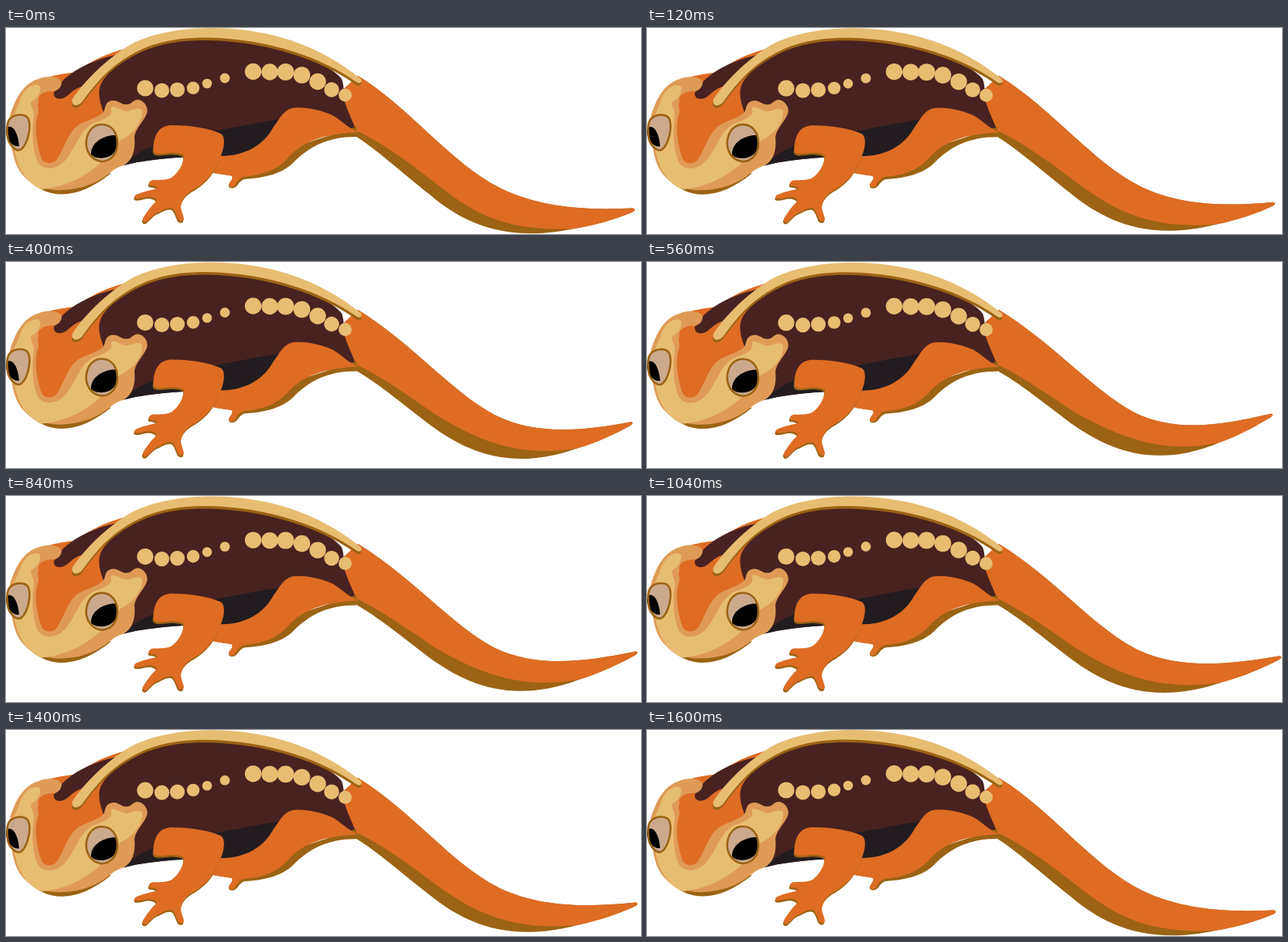
These frames come from a looping animation (821x267 px, 1.88 s). An HTML page with a canvas:

```html
<!DOCTYPE html>
<html lang="en">
<head>
<meta charset="utf-8">
<title>Newt</title>
<style>
  html, body { margin: 0; width: 100%; height: 100%; overflow: hidden; background: #fff; }
  canvas { display: block; width: 821px; height: 267px; }
</style>
</head>
<body>
<canvas id="stage"></canvas>
<script>
const W = 821, H = 267, LOOP = 1880, STEP = 40, MOVE_END = 1600;
const canvas = document.getElementById('stage');
const ctx = canvas.getContext('2d');
const ratio = window.devicePixelRatio || 1;
canvas.width = Math.round(W * ratio);
canvas.height = Math.round(H * ratio);

const color = {
  orange: '#de6c23', brown: '#9b6313', cream: '#e7bd72', tan: '#df9b56',
  maroon: '#482220', shade: '#221c20', lid: '#cba98d', black: '#000'
};

const shape = d => new Path2D(d);

const nape = shape('M14 100C36 60 66 61 92 57C110 42 130 33 157 26L200 40L135 112L95 165L55 182L25 150Z');
const napePatch = shape('M62 83C66 80 71 76 71 71C85 55 114 40 146 34L128 60L104 76C94 74 86 82 79 88C72 94 60 93 62 83Z');
const trunk = shape('M152 178C160 160 160 130 126 109C122 98 118 86 122 74C126 64 140 50 155 38C220 -2 340 10 400 42C415 50 428 58 434 66C438 76 436 88 438 96C442 108 448 121 453 133L345 142C330 158 300 166 280 166C240 167 195 167 152 178Z');
const belly = shape('M152 178C166 164 178 157 195 151C230 141 300 127 355 118L345 142C330 158 300 166 280 166C240 167 195 167 152 178Z');
const stripe = shape('M86 92C100 70 130 40 160 22C195 3 240 0 265 0C340 0 405 22 459 66C461 70 458 73 453 70C410 39 340 14 262 12.5C210 12 180 22 150 42C125 59 111 79 99 95C93 103 83 101 86 92Z');

const hindLegShade = shape('M453 128V141C415 141 392 154 372 174C358 188 338 194 308 196C302 198 300 204 297 206C293 209 287 208 288 203L296 192L268 188Z');
const hindLeg = shape('M456 135C444 131 434 120 422 113C408 107 390 102 372 103.500C358 106 354 118 346 128C334 150 312 166 276 166L266 187C276 190 284 190 292 192C294 196 289 199 288 203C288 207 294 207 296 204C299 199 302 194 308 192.500C332 191 350 184 364 169C384 146 412 137 456 135Z');
const foreLeg = shape('M191 154C192 135 200 126 215 126C240 126 262 130 278 137C284 141 282 155 279 162C272 184 262 197 245 208C233 214 227 222 226 232C227 239 230 244 230 248C229 251 224 251 222 247C219 239 217 233 213 233C205 233 200 238 196 239C190 242 185 249 182 251C178 253 175 249 178 245C183 237 188 230 194 225C196 222 192 220 188 219C180 218 175 222 168 221C164 219 167 216 171 215C177 212 188 210 196 208C195 205 190 204 186 204C183 202 185 198 190 197C200 197 208 197 214 194C222 188 230 177 230 165C222 159 205 163 197 163C190 162 190 159 191 154Z');

const chin = shape('M24 192C52 224 92 224 136 188Z');
const head = shape('M42 66C56 60 72 64 72 71C71 79 65 82 58 82C49 82 40 87 42 96C39 101 44 106 41 113C35 130 42 160 47 171C51 177 62 176 66 170C76 155 80 134 95 125C108 118 121 115 126 109C129 105 127 95 138 94C145 93 149 100 157 99C162 99 165 92 171 93C179 94 185 104 182 111C177 123 168 129 166 141C168 159 163 172 152 178C138 182 133 190 124 195C94 214 45 217 24 193C9 178 8 158 5 135C3 118 5 112 10 100C17 82 28 70 42 66Z');
const headLight = shape('M44 76C40 70 23 76 18 94C14 106 8 113 7 126C10 152 11 170 21 187C29 199 38 207 47 209C77 206 105 192 125 172C140 160 144 150 147 146C160 140 177 126 176 107C171 101 162 108 155 108C147 106 134 97 136 106C139 114 125 119 112 124C95 133 91 154 78 170C66 185 48 185 41 174C34 158 33 133 36 115C38 106 27 97 35 94C41 91 46 81 44 76Z');
const leftEye = shape('M4 119C10 111 25 110 29 118C33 129 28 150 20 157C13 162 2 150 2 139C1 131 1 124 4 119Z');
const leftPupil = shape('M3 128C10 126 16 138 17 153C11 155 1 147 0.500 138C0 134 0 130 3 128Z');
const rightEye = shape('M104 145C106 132 114 125 124 125C136 125 144 135 144 149C144 163 136 173 123 173C110 171 102 159 104 145Z');
const rightPupil = shape('M143 139C126 138 109 149 110 164C117 172 143 171 144 150Z');

// x, y, radius
const spots = [
  [180, 78, 10.6], [201.5, 81, 9.6], [221.5, 80, 9.6], [242, 77.7, 8.2], [260, 72, 6.3],
  [283, 65, 6.4], [319.5, 56.5, 10.7], [341, 57, 10.7], [361.5, 57, 11], [382.5, 61, 10.8],
  [403, 69.5, 10.7], [421, 80, 9.7], [438.5, 87, 8.5]
];

// Tail curves as x, y pairs for the lowered and the raised pose.
const tailTop = {
  low: [455, 62, 525, 105, 575, 176, 640, 208, 695, 235, 760, 236, 810, 233.5,
    814, 234, 814, 237, 809, 239, 790, 247, 765, 255, 735, 260],
  high: [455, 62, 525, 105, 575, 165, 630, 195, 685, 222, 745, 211, 805, 197,
    810, 196, 810, 199, 806, 201.5, 785, 214, 765, 225, 740, 234]
};
const tailBottom = {
  low: [640, 265, 600, 235, 560, 205, 520, 173, 485, 148, 453, 133],
  high: [660, 252, 600, 220, 555, 196, 520, 173, 485, 148, 453, 133]
};
const tailShade = {
  low: [645, 279, 590, 252, 548, 216, 510, 186, 480, 158, 453, 141],
  high: [655, 270, 595, 242, 548, 209, 510, 180, 480, 156, 453, 141]
};

// time, lift of the tail, outward stretch of its tip
const keys = [
  [0, 0, 0], [560, 1, 0], [840, 0.87, 7], [1040, 0.71, 10], [1120, 0.65, 11], [1600, 0, 0]
];

const mix = (a, b, k) => a + (b - a) * k;

function poseAt(time) {
  const next = Math.max(1, keys.findIndex(key => key[0] >= time));
  const a = keys[next - 1], b = keys[next];
  const k = (time - a[0]) / (b[0] - a[0]);
  return { lift: mix(a[1], b[1], k), stretch: mix(a[2], b[2], k) };
}

function bend(curve, pose) {
  const values = curve.low.map((v, i) => mix(v, curve.high[i], pose.lift));
  for (let i = 0; i < values.length; i += 2) {
    const reach = Math.max(0, (values[i] - 600) / 210);
    values[i] += pose.stretch * reach * reach;
  }
  return values;
}

function curves(path, values, start = 0) {
  for (let i = start; i < values.length; i += 6) path.bezierCurveTo(...values.slice(i, i + 6));
}

function fill(path, tone, dx = 0, dy = 0) {
  ctx.save();
  ctx.translate(dx, dy);
  ctx.fillStyle = tone;
  ctx.fill(path);
  ctx.restore();
}

function drawTail(pose) {
  const top = bend(tailTop, pose);
  for (const [under, tone] of [[tailShade, color.brown], [tailBottom, color.orange]]) {
    const path = new Path2D();
    path.moveTo(top[0], top[1]);
    curves(path, top, 2);
    curves(path, bend(under, pose));
    path.lineTo(425, 90);
    path.closePath();
    fill(path, tone);
  }
}

function drawEye(eye, pupil) {
  fill(eye, color.lid);
  fill(pupil, color.black);
  ctx.strokeStyle = color.brown;
  ctx.lineWidth = 2.6;
  ctx.stroke(eye);
}

function drawBody() {
  fill(nape, color.orange);
  fill(napePatch, color.maroon);
  fill(trunk, color.maroon);
  fill(belly, color.shade);
  fill(stripe, color.brown, -0.5, 3.5);
  fill(stripe, color.cream);
  fill(hindLegShade, color.brown);
  fill(hindLeg, color.orange);
  fill(foreLeg, color.brown, -0.8, 2.5);
  fill(foreLeg, color.orange);

  for (const [x, y, r] of spots) {
    const spot = new Path2D();
    spot.arc(x, y, r, 0, Math.PI * 2);
    fill(spot, color.cream);
  }

  fill(chin, color.brown);
  fill(head, color.tan);
  fill(headLight, color.cream);
  drawEye(leftEye, leftPupil);
  drawEye(rightEye, rightPupil);
}

function draw(now) {
  const time = Math.min(MOVE_END, Math.floor((now % LOOP) / STEP) * STEP);
  const pose = poseAt(time);
  ctx.setTransform(ratio, 0, 0, ratio, 0, 0);
  ctx.fillStyle = '#fff';
  ctx.fillRect(0, 0, W, H);
  drawTail(pose);
  ctx.translate(0, pose.lift * 0.7);
  drawBody();
}

let start = null;
function tick(now) {
  if (start === null) start = now;
  draw(Math.max(0, now - start));
  requestAnimationFrame(tick);
}
draw(0);
requestAnimationFrame(tick);
</script>
</body>
</html>
```
